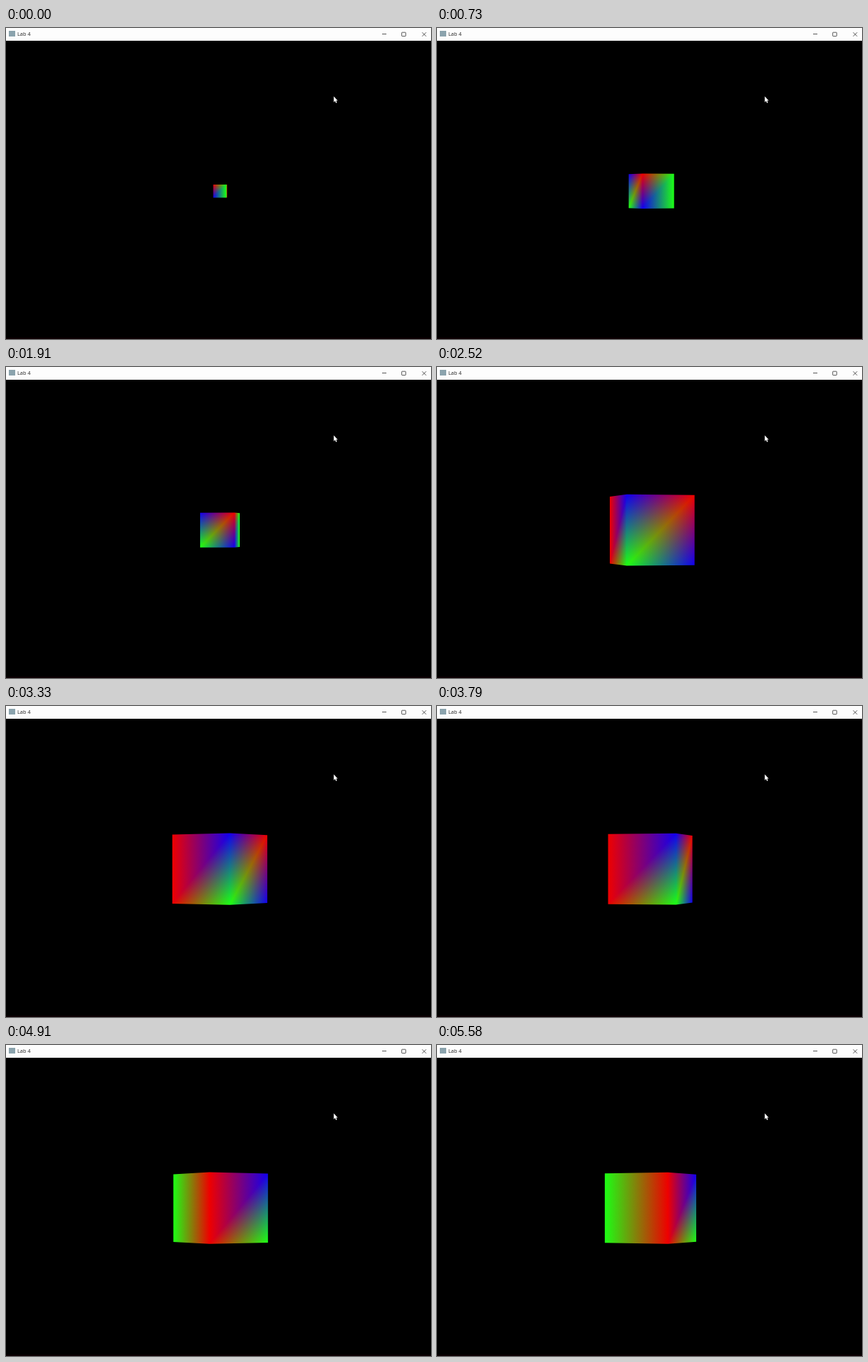
Recreate the animation shown at these times as an HTML page with a canvas. Size 600 px wide and 439 px high, loop 5610 ms.

```html
<!DOCTYPE html>
<html lang="en">
<head>
<meta charset="utf-8">
<title>Lab 4</title>
<style>
  html, body { margin: 0; width: 100%; height: 100%; overflow: hidden; background: #000; }
  canvas, svg { position: absolute; left: 0; top: 0; width: 600px; height: 439px; }
  text { font: 7.4px "Open Sans", "Noto Sans", sans-serif; fill: #222; }
</style>
</head>
<body>
<canvas id="scene" width="600" height="439"></canvas>
<svg viewBox="0 0 600 439">
  <rect width="600" height="18" fill="#fdfdfd"/>
  <rect x="4" y="4" width="9" height="8" fill="#8ba3ad"/>
  <text x="16" y="11">Lab 4</text>
  <g fill="none" stroke="#444" stroke-width=".9">
    <path d="M531 8.5h6"/>
    <rect x="558.7" y="6.2" width="5.6" height="5.4" rx=".6"/>
    <path d="M587.6 6.2l5.6 5.6m0-5.6l-5.6 5.6"/>
  </g>
  <rect y="437" width="600" height="2" fill="#0c0003"/>
  <path d="M462.7 96.5v8.3l1.9-1.7 1.3 2.8 1.3-.6-1.2-2.7h2.3z" fill="#fff"/>
</svg>
<script>
const LOOP = 5610, STEP = 30;
const CENTER = { x: 302.4, y: 230.2 };
const UNIT = 48.3;       // half an edge in pixels at full scale
const DISTANCE = 30;     // camera distance in half edges at full scale

const RED = [238, 0, 0], GREEN = [28, 255, 20], BLUE = [18, 0, 238];

// Vertical edges of the cube, 90 degrees apart.
const EDGES = [
  { top: BLUE, bottom: GREEN },
  { top: RED, bottom: BLUE },
  { top: GREEN, bottom: GREEN },
  { top: RED, bottom: RED }
];

// [time, degrees]
const TURN = [[0, -139], [730, -110], [1910, -54], [2520, -28.9],
              [3330, 10.9], [4270, 49.5], [5580, 109.2], [5610, 110.5]];

const ctx = document.getElementById("scene").getContext("2d");

function angleAt(t) {
  const i = TURN.findIndex(([time]) => time > t);
  const [t0, a0] = TURN[i - 1], [t1, a1] = TURN[i];
  return a0 + (a1 - a0) * (t - t0) / (t1 - t0);
}

function scaleAt(t) {
  return t < 290 ? 0.19 : t < 1940 ? 0.5 : 1;
}

function projectEdge(degrees, scale, colors) {
  const a = degrees * Math.PI / 180;
  const x = Math.SQRT2 * Math.sin(a), z = Math.SQRT2 * Math.cos(a);
  const size = UNIT * scale / (1 - z * scale / DISTANCE);
  const px = CENTER.x + x * size;
  return {
    x: px,
    top: { x: px, y: CENTER.y - size, color: colors.top },
    bottom: { x: px, y: CENTER.y + size, color: colors.bottom }
  };
}

// Adds one vertex's colour, fading to black at the opposite side.
function addVertexColor(v, p, q) {
  const dx = q.x - p.x, dy = q.y - p.y;
  const k = ((v.x - p.x) * dx + (v.y - p.y) * dy) / (dx * dx + dy * dy);
  const fade = ctx.createLinearGradient(p.x + k * dx, p.y + k * dy, v.x, v.y);
  fade.addColorStop(0, "#000");
  fade.addColorStop(1, `rgb(${v.color})`);
  ctx.fillStyle = fade;
  ctx.fill();
}

function drawTriangle(a, b, c) {
  ctx.beginPath();
  for (const p of [a, b, c]) ctx.lineTo(p.x, p.y);
  ctx.closePath();
  addVertexColor(a, b, c);
  addVertexColor(b, c, a);
  addVertexColor(c, a, b);
}

function draw(t) {
  const angle = angleAt(t), scale = scaleAt(t);
  const edges = EDGES.map((colors, i) => projectEdge(angle + 90 * i, scale, colors));
  ctx.globalCompositeOperation = "source-over";
  ctx.fillStyle = "#000";
  ctx.fillRect(0, 0, 600, 439);
  ctx.globalCompositeOperation = "lighter";
  edges.forEach((left, i) => {
    const right = edges[(i + 1) % 4];
    if (right.x - left.x < 0.05) return;   // faces away
    drawTriangle(left.top, right.top, left.bottom);
    drawTriangle(left.bottom, right.top, right.bottom);
  });
}

const start = performance.now();
function tick() {
  const t = (performance.now() - start) % LOOP;
  draw(Math.floor(t / STEP) * STEP);
  requestAnimationFrame(tick);
}
tick();
</script>
</body>
</html>
```
